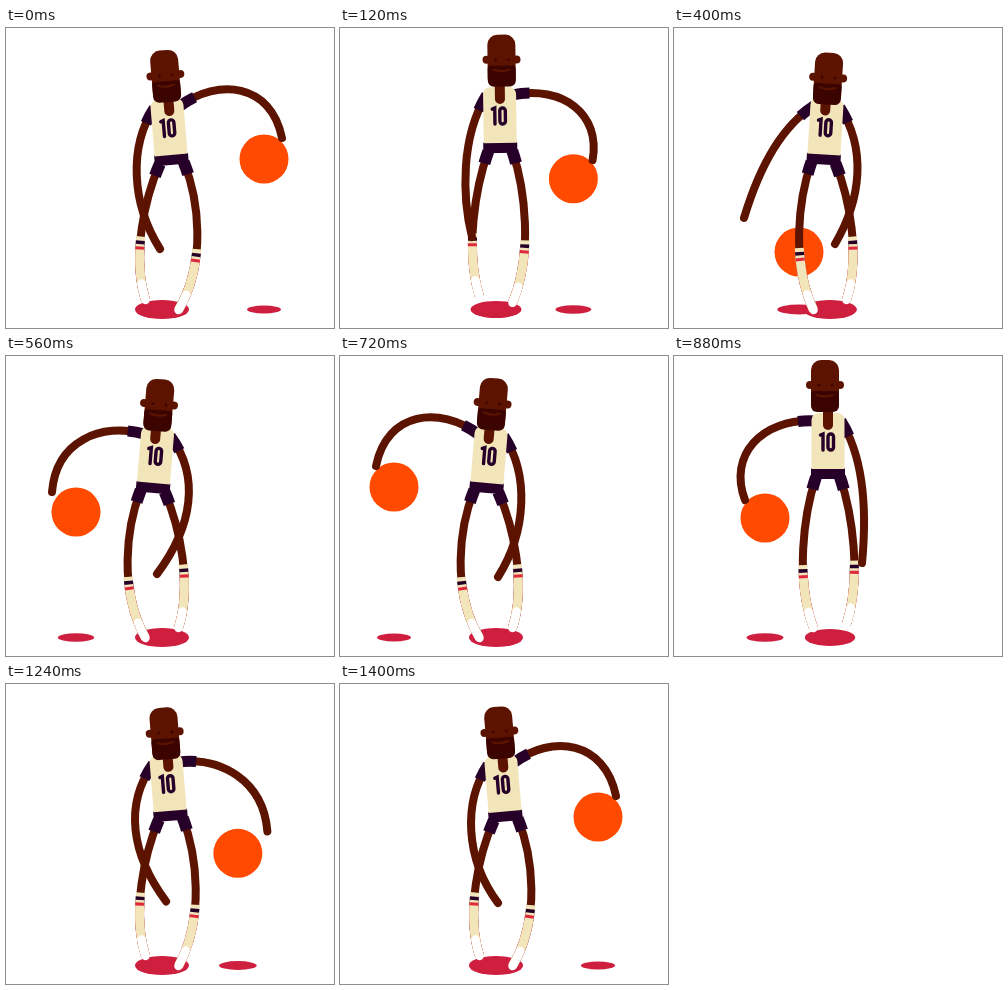
Write an HTML page with a canvas that moves like this. It is 328 px wide and 300 px high and loops after 1.44 s.

```html
<!DOCTYPE html>
<html lang="en">
<head>
<meta charset="utf-8">
<title>Dribble</title>
<style>
  html, body { margin: 0; overflow: hidden; background: #fff; }
  canvas { display: block; }
</style>
</head>
<body>
<canvas id="stage" width="328" height="300"></canvas>
<script>
const ctx = document.getElementById('stage').getContext('2d');
const LOOP = 1440, HALF = LOOP / 2, STEP = 40, AXIS = 156, FLOOR = 256;
const SKIN = '#5c1400', BEARD = '#3c0400', CREAM = '#f2e5ba', NAVY = '#270029',
      RED = '#e0283c', SHADOW = '#cf1f3f', BALL = '#ff4a00';

// The second half of the loop mirrors the first; signs tell which values flip.
const mirrored = (rows, signs) => rows.concat(
  rows.map(([t, ...v]) => [t + HALF, ...v.map((n, i) => n * signs[i])]));

// time, x from axis, signed height above floor (the sign flips at the bounce)
const ballTrack = mirrored([
  [0, 102, 125], [160, 65, 94], [240, 33, 51], [360, -15, -14],
  [400, -31, -32], [560, -86, -100], [680, -102, -123]
], [-1, -1]);

// time, pelvis x from axis, pelvis y, lean in degrees, head x, head y
const bodyTrack = mirrored([
  [0, 9, 126, -4.8, 1, -104], [160, 2, 112, 0, 3, -108],
  [240, -2.5, 115, 0, 4, -107], [360, -5.5, 126, 2.2, 1, -101.5],
  [400, -6, 125.5, 3.5, -0.5, -101], [560, -8.5, 126, 4.8, -1, -103],
  [680, -9, 126.5, 4.8, -1, -104]
], [-1, 1, -1, -1, 1]);

// time, two control points and the hand of the right arm
const armTrack = [
  [0, 212, 50, 265, 55, 276, 110], [160, 225, 62, 258, 100, 241, 144],
  [240, 208, 88, 227, 130, 212, 182], [360, 188, 125, 187, 175, 166, 218],
  [400, 192, 120, 188, 170, 161, 216], [560, 194, 120, 187, 170, 151, 218],
  [680, 189, 118, 187, 175, 154, 219], [720, 189, 118, 187, 175, 158, 221],
  [880, 192, 105, 192, 165, 188, 207], [960, 194, 100, 202, 150, 204, 207],
  [1080, 204, 105, 215, 165, 229, 205], [1120, 204, 98, 227, 140, 242, 190],
  [1280, 217, 66, 262, 85, 266, 136], [1400, 212, 50, 265, 57, 276, 112]
];

// time, foot y, outward bend of the right leg
const legTrack = [
  [0, 284, 43], [160, 274, 31], [240, 270, 30], [360, 274, 29], [720, 274, 30],
  [880, 270, 28], [960, 274, 28], [1080, 284, 34], [1400, 284, 43]
];

// Periodic monotone cubic interpolation.
function sample(track, time) {
  const t = time % LOOP, n = track.length;
  const key = i => {
    const turn = Math.floor(i / n), row = track[i - turn * n];
    return [row[0] + turn * LOOP, ...row.slice(1)];
  };
  let i = n - 1;
  while (track[i][0] > t) i--;
  const [a, b, c, d] = [i - 1, i, i + 1, i + 2].map(key);
  const span = c[0] - b[0], u = (t - b[0]) / span;
  const tangent = (p, q) => p * q <= 0 ? 0 : 2 * p * q / (p + q);
  return b.slice(1).map((v, j) => {
    const slope = (p, q) => (q[j + 1] - p[j + 1]) / (q[0] - p[0]);
    const mid = slope(b, c);
    const m0 = tangent(slope(a, b), mid) * span, m1 = tangent(mid, slope(c, d)) * span;
    const delta = c[j + 1] - v;
    return v + u * (m0 + u * (3 * delta - 2 * m0 - m1 + u * (m0 + m1 - 2 * delta)));
  });
}

function ellipse(x, y, rx, ry, color) {
  ctx.fillStyle = color;
  ctx.beginPath();
  ctx.ellipse(x, y, rx, ry, 0, 0, 7);
  ctx.fill();
}

function box(x, y, w, h, radii, color) {
  ctx.fillStyle = color;
  ctx.beginPath();
  ctx.roundRect(x, y, w, h, radii);
  ctx.fill();
}

// Strokes the first part of a path, or all of it.
function stroke(path, color, width, length = 999, cap = 'butt') {
  ctx.strokeStyle = color;
  ctx.lineWidth = width;
  ctx.lineCap = cap;
  ctx.setLineDash([length, 999]);
  ctx.stroke(new Path2D(path));
}

const curve = (a, b, c, d) => `M${a}C${b} ${c} ${d}`;

function onBody(body, x, y) {
  const a = body.lean, c = Math.cos(a), s = Math.sin(a);
  return [body.x + x * c - y * s, body.y + x * s + y * c];
}

const flip = (side, x) => side > 0 ? x : 2 * AXIS - x;
const sideTime = (side, t) => side > 0 ? t : t + HALF;

function drawLeg(side, t, body) {
  const [footY, bend] = sample(legTrack, sideTime(side, t));
  const hip = onBody(body, side * 12, 9), foot = [flip(side, 172.5), footY - 2];
  const along = (k, out) => [
    hip[0] + (foot[0] - hip[0]) * k + side * out,
    hip[1] + (foot[1] - hip[1]) * k];
  const knee = along(0.25, bend * 0.38), shin = along(0.68, bend * 0.62);
  const down = curve(hip, knee, shin, foot), up = curve(foot, shin, knee, hip);
  stroke(down, SKIN, 8);
  [[CREAM, 64], [NAVY, 60], [CREAM, 56.5], [RED, 54], [CREAM, 51]]
    .forEach(([color, length]) => stroke(up, color, 9, length));
  stroke(up, '#fff', 8.5, 17, 'round');
  stroke(down, NAVY, 12, 13);
}

function drawArm(side, t, body) {
  const [ax, ay, bx, by, hx, hy] = sample(armTrack, sideTime(side, t));
  const path = curve(onBody(body, side * 13, -47),
    [flip(side, ax), ay], [flip(side, bx), by], [flip(side, hx), hy]);
  stroke(path, SKIN, 8, 999, 'round');
  stroke(path, NAVY, 11, 17);
}

function drawTorso(body) {
  ctx.save();
  ctx.translate(body.x, body.y);
  ctx.rotate(body.lean);
  box(-17, 0, 34, 11, 1, NAVY);
  box(-16.5, -55, 33, 56, [7, 7, 0, 0], CREAM);
  const neck = -body.lean * 23;
  stroke(`M${neck} -60V-43`, SKIN, 10, 999, 'round');
  stroke('M-7.5 -33L-5 -34V-18', NAVY, 3.4, 999, 'round');
  ctx.lineWidth = 3.4;
  ctx.beginPath();
  ctx.roundRect(0, -34, 5.5, 16, 2.7);
  ctx.stroke();

  ctx.translate(body.headX, body.headY);
  ellipse(-15, 25, 4, 4, SKIN);
  ellipse(15, 25, 4, 4, SKIN);
  box(-14, 0, 28, 50, [10, 10, 6, 6], SKIN);
  box(-14, 31, 28, 21, [3, 3, 6, 6], BEARD);
  ellipse(-6, 25, 1.4, 1.4, BEARD);
  ellipse(7, 25, 1.4, 1.4, BEARD);
  stroke('M-8 35Q0 38 8 35', SKIN, 2, 999, 'round');
  ctx.restore();
}

function draw(now) {
  const t = Math.floor(now / STEP) * STEP % LOOP;
  const [ballDx, height] = sample(ballTrack, t);
  const ballX = AXIS + ballDx, ballY = FLOOR - Math.abs(height);
  const [dx, y, lean, headX, headY] = sample(bodyTrack, t);
  const body = { x: AXIS + dx, y, lean: lean * Math.PI / 180, headX, headY };
  const near = t < HALF ? 1 : -1;

  ctx.clearRect(0, 0, 328, 300);
  ellipse(AXIS, 281.5, 27 - (126 - y) * 0.13, 9.5 - (126 - y) * 0.08, SHADOW);
  ellipse(ballX, 281.5, 17 + (ballY - 131) * 0.05, 4 + (ballY - 131) * 0.01, SHADOW);
  drawLeg(near, t, body);
  ellipse(ballX, ballY, 24.5, 24.5, BALL);
  drawLeg(-near, t, body);
  drawArm(near, t, body);
  drawArm(-near, t, body);
  drawTorso(body);
  requestAnimationFrame(draw);
}
requestAnimationFrame(draw);
</script>
</body>
</html>
```
